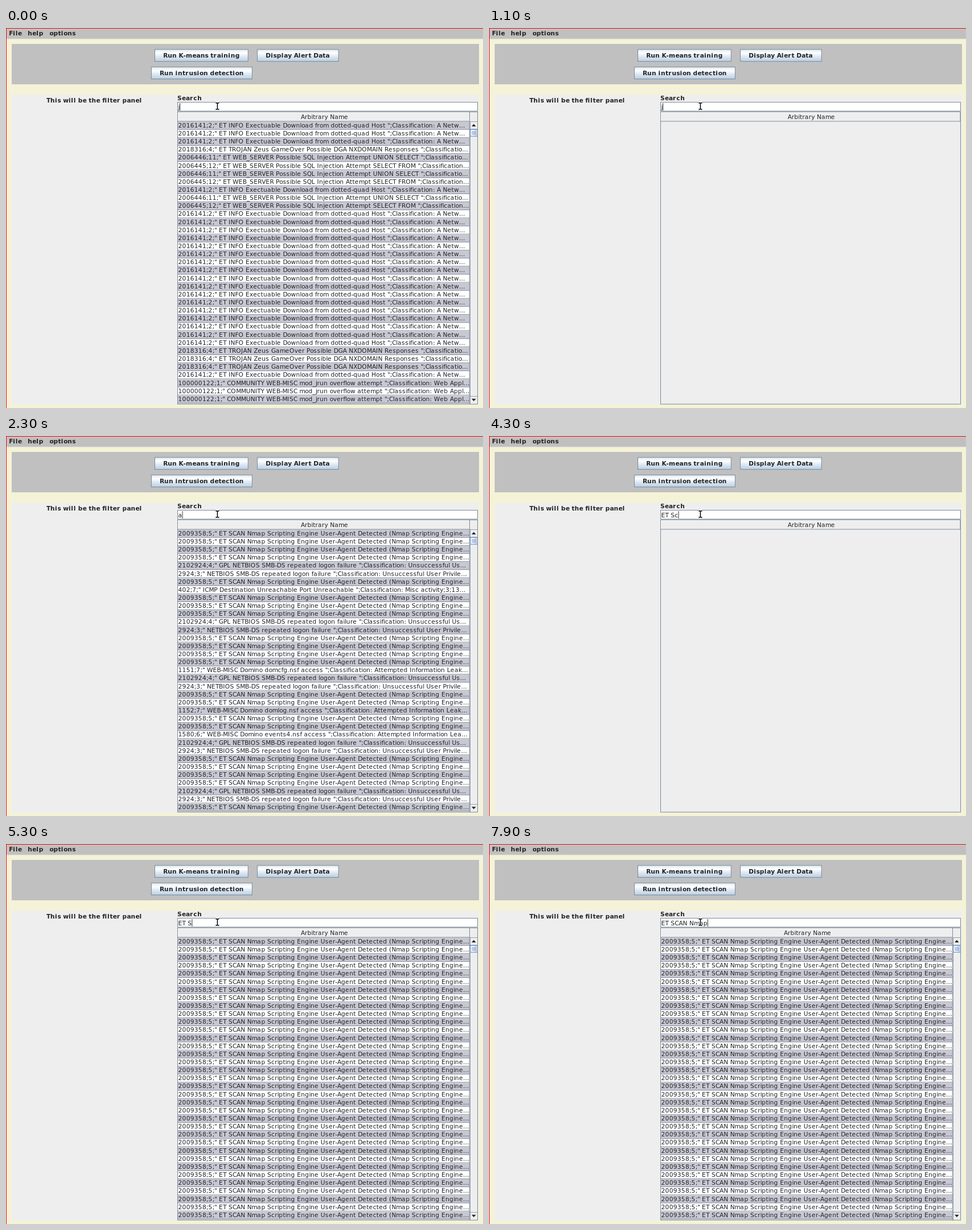
Write an HTML page that moves like this. It is 838 px wide and 668 px high and loops after 8 s.

```html
<!DOCTYPE html>
<html lang="en">
<head>
<meta charset="utf-8">
<title>Alert search</title>
<style>
html, body { margin: 0; width: 100%; height: 100%; overflow: hidden; background: #f5f3d7; }
svg { display: block; width: 838px; height: 668px; }
text {
  font: 10.61px "DejaVu Sans", sans-serif;
  font-variant-ligatures: none;
  font-kerning: none;
  fill: #222;
  white-space: pre;
}
.bold { font-weight: bold; }
.edge { fill: none; stroke: #7a8a99; }
</style>
</head>
<body>
<svg id="stage" viewBox="0 0 838 668">
  <defs>
    <linearGradient id="steel" x2="0" y2="1">
      <stop stop-color="#dde8f3"/>
      <stop offset=".3" stop-color="#fff"/>
      <stop offset=".6" stop-color="#dde8f3"/>
      <stop offset="1" stop-color="#b8cfe5"/>
    </linearGradient>
    <linearGradient id="thumb">
      <stop stop-color="#dde8f3"/>
      <stop offset=".3" stop-color="#fff"/>
      <stop offset="1" stop-color="#b8cfe5"/>
    </linearGradient>
    <path id="beam" d="M368.3 131.8H370.4L371.4 132.7 372.4 131.8H374.5M371.4 132.5V142.3M368.3 143H370.4L371.4 142.1 372.4 143H374.5"/>
  </defs>
  <rect width="838" height="668" fill="#f5f3d7"/>
  <rect width="838" height="19" fill="#c0c0c0"/>
  <rect y="18.4" width="838" height="1" fill="#ccc"/>
  <rect x="10" y="28" width="821" height="71" fill="#c0c0c0"/>
  <rect x="10" y="117" width="821" height="545" fill="#eee"/>
  <path d="M0 .5H838M.5 0V668" stroke="#f00"/>
  <g id="chrome"></g>
  <rect x="301.5" y="130.5" width="527" height="15.5" fill="#fff" stroke="#7a8a99"/>
  <g id="tables"></g>
  <rect class="edge" x="301.5" y="147.5" width="527" height="513.7"/>
  <g id="query"></g>
  <rect id="caret" y="132" width="1" height="13" fill="#333"/>
  <g fill="none">
    <use href="#beam" stroke="#fff" stroke-width="3"/>
    <use href="#beam" stroke="#000" stroke-width="1.5"/>
  </g>
</svg>
<script>
const SCALE = 0.8842, ROW = 16 * SCALE, TOP = 164.5, LEFT = 302.5, LOOP = 8000;
const $ = id => document.getElementById(id);
const pen = document.createElement('canvas').getContext('2d');

// Whole-pixel glyph advances at 12px, with the few that hinting rounds up or down
const hinted = {
  normal: { a: 8, e: 8, s: 7, m: 11, O: 10, '"': 5 },
  bold: { i: 5, l: 5, r: 7, c: 8 }
};

function layout(str, weight) {
  pen.font = `${weight} 12px "DejaVu Sans", sans-serif`;
  const xs = [];
  let x = 0;
  for (const ch of str) {
    xs.push(x * SCALE);
    x += hinted[weight][ch] || Math.round(pen.measureText(ch).width);
  }
  return { xs, width: x * SCALE };
}

function add(parent, tag, attrs) {
  const el = document.createElementNS('http://www.w3.org/2000/svg', tag);
  for (const key in attrs) el.setAttribute(key, attrs[key]);
  return parent.appendChild(el);
}

function write(parent, str, x, y, weight = 'normal') {
  const { xs } = layout(str, weight);
  const el = add(parent, 'text', { x: xs.map(v => (x + v).toFixed(2)).join(' '), y, class: weight });
  el.textContent = str;
}

function button(str, x, y, w) {
  add($('chrome'), 'rect', { x, y, width: w, height: 21, fill: 'url(#steel)', stroke: '#7a8a99' });
  write($('chrome'), str, x + 14.7, y + 14.4, 'bold');
}

const kinds = {
  I: '2016141;2;" ET INFO Exectuable Download from dotted-quad Host ";Classification: A Netw...',
  Z: '2018316;4;" ET TROJAN Zeus GameOver Possible DGA NXDOMAIN Responses ";Classificatio...',
  U: '2006446;11;" ET WEB_SERVER Possible SQL Injection Attempt UNION SELECT ";Classificatio...',
  S: '2006445;12;" ET WEB_SERVER Possible SQL Injection Attempt SELECT FROM ";Classification...',
  J: '100000122;1;" COMMUNITY WEB-MISC mod_jrun overflow attempt ";Classification: Web Appl...',
  N: '2009358;5;" ET SCAN Nmap Scripting Engine User-Agent Detected (Nmap Scripting Engine...',
  G: '2102924;4;" GPL NETBIOS SMB-DS repeated logon failure ";Classification: Unsuccessful Us...',
  B: '2924;3;" NETBIOS SMB-DS repeated logon failure ";Classification: Unsuccessful User Privile...',
  C: '402;7;" ICMP Destination Unreachable Port Unreachable ";Classification: Misc activity;3;13...',
  D: '1151;7;" WEB-MISC Domino domcfg.nsf access ";Classification: Attempted Information Leak...',
  L: '1152;7;" WEB-MISC Domino domlog.nsf access ";Classification: Attempted Information Leak...',
  E: '1580;6;" WEB-MISC Domino events4.nsf access ";Classification: Attempted Information Lea...'
};

function header(g, right) {
  add(g, 'rect', { x: 302, y: 148, width: right - 302, height: 16, fill: '#eee' });
  add(g, 'path', { d: `M302.5 163V148.5H${right - 1}`, stroke: '#fff', fill: 'none' });
  add(g, 'path', { d: `M302 164H${right - .5}V148`, class: 'edge' });
  const title = 'Arbitrary Name';
  write(g, title, (304 + right - layout(title, 'normal').width) / 2, 159.8);
}

function scrollbar(g) {
  add(g, 'rect', { x: 815, y: 164.5, width: 13.5, height: 496.5, fill: '#eee' });
  add(g, 'path', { d: 'M815.5 164V661M815 164.5H828M815 178H828M815 647.5H828', class: 'edge', 'stroke-width': .8 });
  add(g, 'path', { d: 'M818 173L821.8 168.8 825.6 173ZM818 651.8L821.8 656 825.6 651.8Z', fill: '#222' });
  add(g, 'rect', { x: 815.5, y: 178.4, width: 13, height: 11.8, fill: 'url(#thumb)', stroke: '#6382bf' });
  add(g, 'path', { d: 'M818 182H826M818 184.4H826M818 186.8H826', stroke: '#6382bf', 'stroke-width': .9 });
}

function table(rows) {
  const g = add($('tables'), 'g', { visibility: 'hidden' });
  if (!rows) {
    header(g, 828.5);
    return g;
  }
  add(g, 'rect', { x: 302, y: TOP, width: 512.5, height: 496, fill: '#fff' });
  [...rows].forEach((kind, i) => {
    const y = TOP + i * ROW;
    if (i % 2 === 0) add(g, 'rect', { x: 302, y, width: 512.5, height: ROW, fill: '#c8c8d3' });
    add(g, 'path', { d: `M302 ${y + ROW - .45}H814.5`, class: 'edge', 'stroke-width': .9 });
    write(g, kinds[kind], LEFT, y + 10.3);
  });
  add(g, 'path', { d: `M814.2 ${TOP}V661`, class: 'edge', 'stroke-width': .9 });
  header(g, 815);
  scrollbar(g);
  return g;
}

write($('chrome'), 'File', 5.2, 13.2, 'bold');
write($('chrome'), 'help', 38.3, 13.2, 'bold');
write($('chrome'), 'options', 76.4, 13.2, 'bold');
button('Run K-means training', 261.5, 37.7, 163.8);
button('Display Alert Data', 441.6, 37.7, 142.6);
button('Run intrusion detection', 255.4, 68.6, 177);
write($('chrome'), 'This will be the filter panel', 71, 131.3, 'bold');
write($('chrome'), 'Search', 301, 127.2, 'bold');

const tables = {
  none: table(''),
  j: table('IIIZUSUSIUS' + 'I'.repeat(17) + 'ZZZIJJJ'),
  all: table('NNNNGBNCNNNGBNNNNDGBNNLNNEGBNNNNGBN'),
  scan: table('N'.repeat(35))
};

// start time, typed text, visible table, caret hidden
const steps = [
  [0, 'j', 'j'],
  [500, 'jf', 'none'],
  [1100, 'j', 'none'],
  [1200, 'j', 'j'],
  [1300, '', 'all'],
  [1800, '', 'all', true],
  [2300, 'a', 'all'],
  [4300, 'ET Sc', 'none'],
  [4600, 'ET Sca', 'none'],
  [4700, 'ET Scan', 'none'],
  [4900, 'ET Sca', 'none'],
  [5100, 'ET Sc', 'none'],
  [5300, 'ET S', 'scan'],
  [5900, 'ET SCA', 'scan'],
  [6000, 'ET SCAN', 'scan'],
  [6500, 'ET SCAN ', 'scan'],
  [7000, 'ET SCAN ', 'scan', true],
  [7100, 'ET SCAN N', 'scan'],
  [7600, 'ET SCAN Nm', 'scan'],
  [7900, 'ET SCAN Nmap', 'scan']
];

let shown;
function show(step) {
  if (step === shown) return;
  shown = step;
  const [, str, name, hidden] = step;
  for (const key in tables) tables[key].setAttribute('visibility', key === name ? 'visible' : 'hidden');
  $('query').replaceChildren();
  write($('query'), str, LEFT, 142.5);
  $('caret').setAttribute('x', LEFT + layout(str, 'normal').width);
  $('caret').setAttribute('visibility', hidden ? 'hidden' : 'visible');
}

const start = performance.now();
function tick() {
  const t = (performance.now() - start) % LOOP;
  show(steps.findLast(s => s[0] <= t));
  requestAnimationFrame(tick);
}
tick();
</script>
</body>
</html>
```
